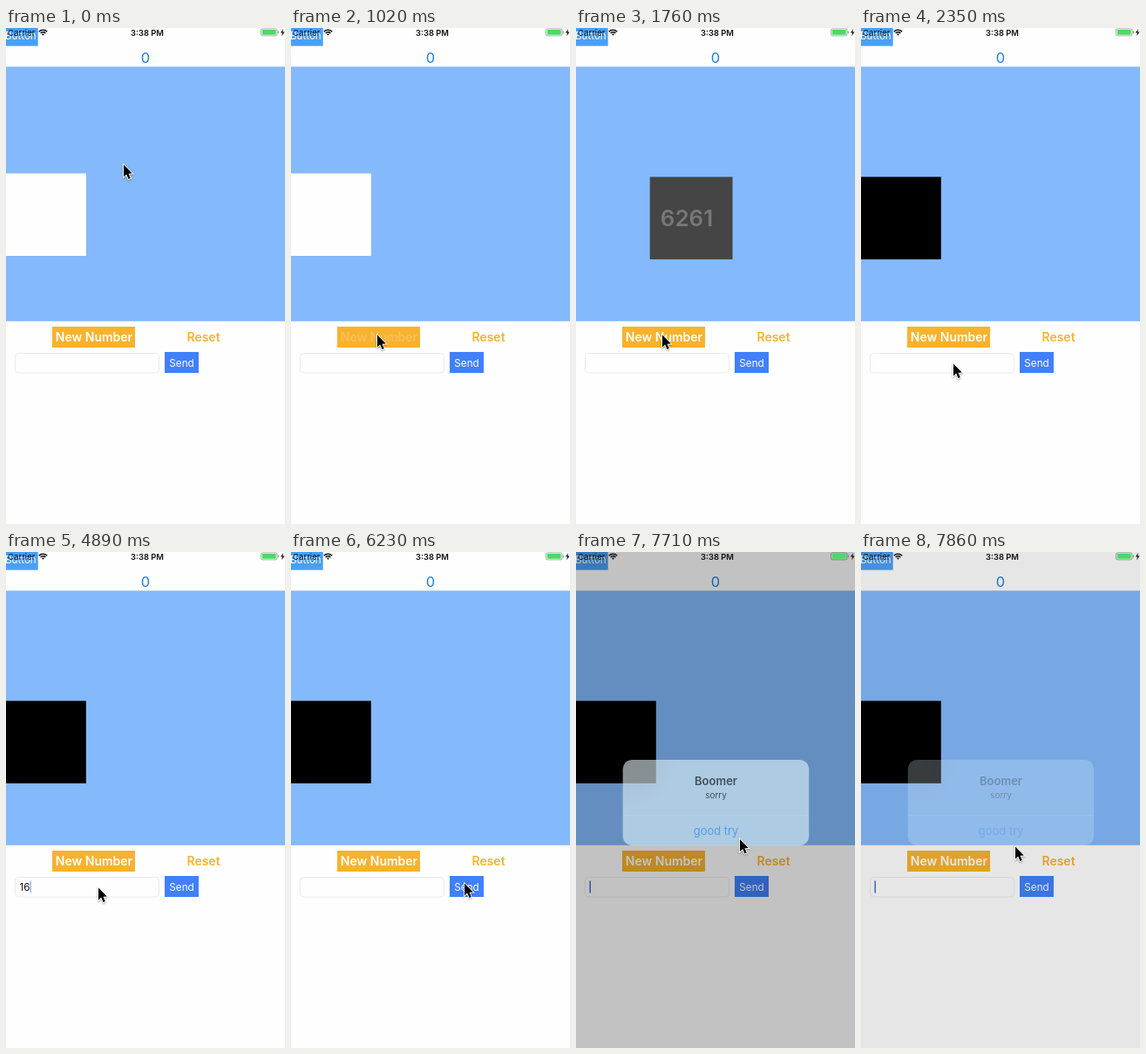
Write an HTML page with a canvas that moves like this. It is 320 px wide and 568 px high and loops after 8 s.

```html
<!DOCTYPE html>
<html lang="en">
<head>
<meta charset="utf-8">
<title>Number memory</title>
<style>
  html, body { margin: 0; width: 100%; height: 100%; overflow: hidden; background: #fefefe; }
  canvas { display: block; width: 320px; height: 568px; }
</style>
</head>
<body>
<canvas id="stage" width="320" height="568"></canvas>
<script>
const ctx = document.getElementById('stage').getContext('2d');
const LOOP = 8000, TICK = 148.7, LAST = 53;
const FONT = 'Inter, "Liberation Sans", sans-serif';
const ORANGE = '#f9b22d', PAPER = '#fefefe', INK = '#111';

// Moments of the story, in ticks
const PRESS = 7, TYPE = 28, RESUME = 34, SEND = 42, ALERT = 44, DISMISS = 50.3;

const mix = (a, b, p) => a + (b - a) * p;
const clamp = (v, top = 1) => Math.min(top, Math.max(0, v));
const ease = v => v * v * (3 - 2 * v);
const progress = (k, from, to) => ease(clamp((k - from) / (to - from)));

function rect(x, y, w, h, color) {
  ctx.fillStyle = color;
  ctx.fillRect(x, y, w, h);
}

function text(str, x, y, size, color, weight = 400, align = 'center') {
  ctx.font = `${weight} ${size}px ${FONT}`;
  ctx.textAlign = align;
  ctx.fillStyle = color;
  ctx.fillText(str, x, y);
}

function rounded(x, y, w, h, r) {
  ctx.beginPath();
  ctx.roundRect(x, y, w, h, r);
}

function polygon(...points) {
  ctx.beginPath();
  points.forEach(([x, y]) => ctx.lineTo(x, y));
  ctx.closePath();
}

function fill(color) {
  ctx.fillStyle = color;
  ctx.fill();
}

function stroke(color, width) {
  ctx.strokeStyle = color;
  ctx.lineWidth = width;
  ctx.stroke();
}

function numberCard(k) {
  if (k <= PRESS) return rect(0, 166.5, 92, 94.5, PAPER);
  const p = progress(k, PRESS + 0.55, PRESS + 7.3);
  const x = mix(323, -3, p), v = Math.round(255 * (1 - p));
  rect(x, 170.5, 94.8, 94.4, `rgb(${v},${v},${v})`);
  text('6261', x + 12, 227, 26, `rgba(255,255,255,${1 - p})`, 600, 'left');
}

function field(k) {
  rounded(10.5, 372.5, 165, 22.5, 4);
  stroke('#ebebeb', 1);
  // four digits in two bursts, cleared on send
  const count = k < SEND ? clamp(k - TYPE + 1, 2) + clamp(k - RESUME + 1, 2) : 0;
  const typed = '1621'.slice(0, count);
  text(typed, 15.5, 387.5, 11.7, INK, 400, 'left');

  const focused = k >= TYPE - 3 && k < SEND || k > DISMISS + 1;
  if (!focused) return;
  const x = 15.5 + ctx.measureText(typed).width;
  rect(x, 376.5, 1.5, 14, `rgba(65,105,225,${typed ? 0.5 : 1})`);
}

function buttons(k) {
  const lit = k < PRESS ? 1 : clamp(0.2 + (k - PRESS) * 0.28);
  rect(53, 342, 95, 24, ORANGE);
  text('New Number', 101, 359, 14, `rgba(255,255,255,${lit})`, 600);
  text('Reset', 226.5, 359, 14, ORANGE, 600);
  rect(182, 371, 39, 24, '#4180fb');
  text('Send', 201.5, 387.5, 11.7, '#fff');
}

function dialog(k) {
  if (k < ALERT) return;
  const show = 1 - progress(k, DISMISS, DISMISS + 3.95);
  rect(0, 0, 320, 568, `rgba(0,0,0,${0.39 * show})`);
  ctx.save();
  ctx.globalAlpha = show;
  rounded(53.7, 238, 213.5, 98.2, 10.5);
  fill('#dcf3f9');
  // blurred corner of the card behind
  const shade = ctx.createRadialGradient(60, 240, 8, 60, 240, 54);
  shade.addColorStop(0, 'rgba(150,120,130,0.24)');
  shade.addColorStop(1, 'rgba(150,120,130,0)');
  fill(shade);
  rect(54, 301, 213, 1, '#bdd5db');
  text('Boomer', 160.5, 266.5, 13, '#000', 600);
  text('sorry', 160.5, 282, 10, '#000');
  text('good try', 160.5, 324, 12.9, '#1580f5');
  ctx.restore();
}

function statusBar() {
  text('Carrier', 2, 8.7, 9.6, INK, 400, 'left');
  text('3:38 PM', 162, 8.7, 9.4, INK, 600);

  for (const r of [1.2, 3.9, 6.5]) {
    ctx.beginPath();
    ctx.arc(42.5, 8.7, r, -Math.PI * 0.76, -Math.PI * 0.24);
    stroke(INK, 1.6);
  }

  const shell = 'rgba(0,0,0,0.4)';
  rounded(292.4, 0.9, 18.6, 8, 2);
  stroke(shell, 0.8);
  rounded(293.7, 2.1, 16, 5.6, 1);
  fill('#4cd964');
  rect(311.8, 3.5, 1, 2.8, shell);
  polygon([317.8, 1], [315, 5.6], [317, 5.6], [316.2, 9.2], [319.5, 4.4], [317.4, 4.4]);
  fill(INK);
}

function pointerAt(k) {
  let spot = [134, 155];
  // eased trip that bows sideways on its way
  const go = (start, end, to, bow = [0, 0]) => {
    const p = progress(k, start, end);
    spot = spot.map((v, i) => mix(v, to[i], p) + bow[i] * Math.sin(Math.PI * p));
  };
  go(0, PRESS, [98, 350], [0, 130]);
  go(PRESS + 7, PRESS + 9, [105, 383]);
  go(SEND - 6, SEND - 1, [198, 378], [85, 45]);
  go(ALERT + 2, ALERT + 4, [198, 319], [19, 0]);
  go(LAST - 2, LAST, [176, 336]);
  return spot;
}

function pointer(k) {
  ctx.save();
  ctx.translate(...pointerAt(k));
  polygon([1, 1.6], [1, 15.6], [4.2, 12.6], [6.5, 18], [8.8, 17], [6.5, 11.8], [10.8, 11.6]);
  ctx.shadowColor = 'rgba(0,0,0,0.35)';
  ctx.shadowBlur = 2;
  ctx.shadowOffsetY = 1;
  stroke('#fff', 1.8);
  ctx.shadowColor = 'transparent';
  fill('#000');
  ctx.restore();
}

function draw(ms) {
  // the screen refreshes on a coarse tick
  const k = clamp(Math.floor((ms % LOOP + 32) / TICK), LAST);
  rect(0, 0, 320, 568, PAPER);
  rect(0, 0, 36.7, 20.6, '#4a9ff5');
  text('Button', -1, 13, 11.6, '#fff', 400, 'left');
  text('0', 160, 40, 16.5, '#1f7fe8');
  rect(0, 44.3, 320, 291.5, '#84b9fb');
  numberCard(k);
  buttons(k);
  field(k);
  dialog(k);
  statusBar();
  pointer(k);
}

const start = performance.now();
function loop() {
  draw(performance.now() - start);
  requestAnimationFrame(loop);
}
loop();
</script>
</body>
</html>
```
